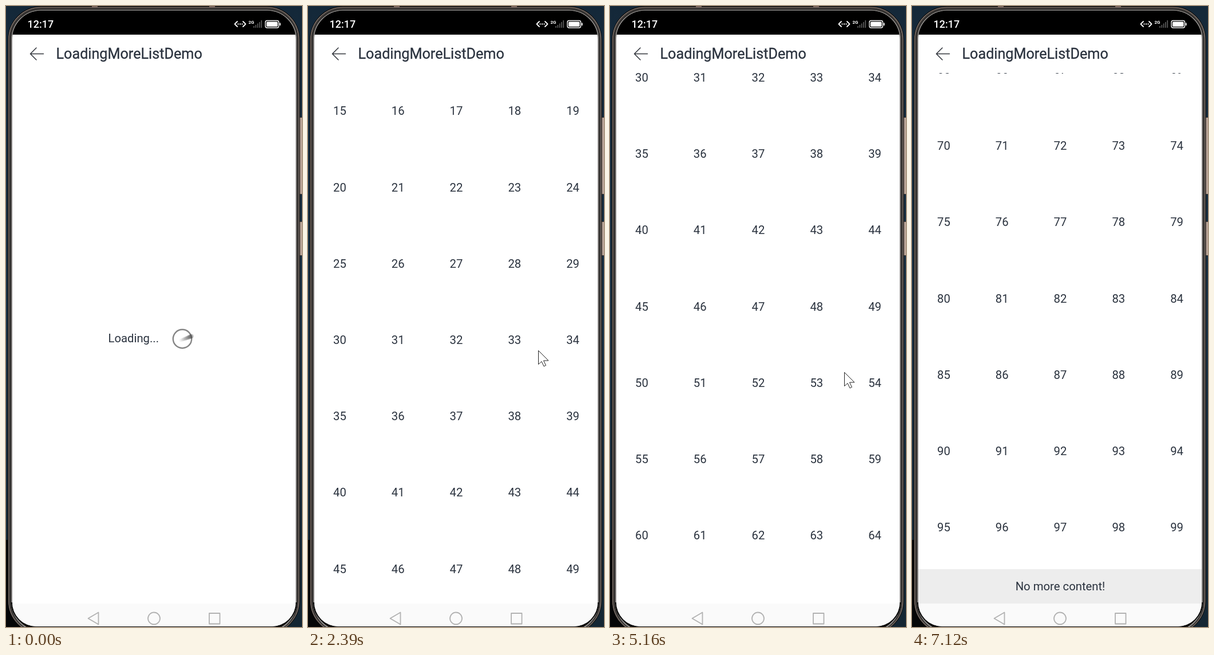
Write an HTML page that moves like this. It is 517 px wide and 1084 px high and loops after 7800 ms.

```html
<!DOCTYPE html>
<html lang="en">
<head>
<meta charset="utf-8">
<title>Loading more list</title>
<style>
  html, body { margin: 0; width: 100%; height: 100%; overflow: hidden; background: #000; }
  svg { display: block; width: 100%; height: 100%; }
  text { font: 20.3px Roboto, "Noto Sans", sans-serif; fill: #2b333f; }
  .title { font-size: 25.2px; stroke: #2b333f; stroke-width: .3; }
  .clock { font-size: 18px; font-weight: 500; fill: #fff; }
  .network { font-size: 8px; font-weight: 700; fill: #fff; }
  .center { text-anchor: middle; }
  .line { fill: none; stroke-linecap: round; stroke-linejoin: round; }
</style>
</head>
<body>
<svg viewBox="0 0 517 1084">
  <defs>
    <linearGradient id="backdrop" x2="0" y2="1">
      <stop offset="0" stop-color="#142839"/><stop offset=".5" stop-color="#1c3346"/>
      <stop offset="1" stop-color="#142633"/>
    </linearGradient>
    <clipPath id="screen">
      <path d="M11 58a50 50 0 0 1 50-50H456a50 50 0 0 1 50 50V1041a42 42 0 0 1-42 42H53a42 42 0 0 1-42-42z"/>
    </clipPath>
    <clipPath id="viewport"><rect x="11" y="117" width="495" height="926"/></clipPath>
  </defs>

  <!-- Phone body -->
  <rect width="517" height="1084" fill="url(#backdrop)"/>
  <rect y="932" width="60" height="152" fill="#050607"/>
  <g fill="#b9a497" stroke="#453b37">
    <rect x="512.5" y="194.5" width="8" height="134"/>
    <rect x="512.5" y="376.5" width="8" height="59"/>
  </g>
  <rect x="3.5" y=".5" width="509.5" height="1096" rx="58" fill="#17130f" stroke="#0a0a0a"/>
  <rect x="5" y="2.5" width="506.500" height="1092" rx="56" fill="none" stroke="#80756f" stroke-width="1.6"/>
  <rect x="7.5" y="5" width="502" height="1088" rx="53" fill="none" stroke="#3c3a39" stroke-width="2"/>
  <rect x="10" y="7.5" width="497" height="1084" rx="51" fill="none" stroke="#9b9a99" stroke-width="1.6"/>
  <path d="M150 1h10M355 1h10" stroke="#79645b" stroke-width="2"/>

  <path d="M11 1041a42 42 0 0 0 42 42H464a42 42 0 0 0 42-42" fill="none" stroke="#080808" stroke-width="4"/>
  <g clip-path="url(#screen)">
    <rect x="11" y="8" width="495" height="42"/>
    <rect x="11" y="50" width="495" height="1033" fill="#fff"/>

    <!-- Status bar -->
    <text class="clock" x="37.5" y="37.5">12:17</text>
    <path class="line" d="M404 27l-4.5 4.5 4.5 4.5M414 27l4.5 4.5-4.5 4.5" stroke="#fff" stroke-width="1.8"/>
    <path d="M404.5 31.5h2m1.5 0h2m1.5 0h2" stroke="#fff" stroke-width="2"/>
    <text class="network" x="423.5" y="31">2G</text>
    <path d="M433 38v-3m3.3 3v-5m3.3 5v-7.5m3.3 7.5v-10m3.3 10v-13" stroke="#5c5c5c" stroke-width="1.7"/>
    <rect x="453" y="25.5" width="23.5" height="12.5" rx="3" fill="none" stroke="#fff" stroke-width="1.4"/>
    <rect x="455" y="27.5" width="19.5" height="8.5" rx="1.5" fill="#fff"/>
    <path d="M478.7 29.5v4.5" stroke="#fff" stroke-width="1.8"/>

    <!-- Title bar -->
    <path class="line" d="M65.500 83.500H42.500M53 73L42.500 83.500 53 94" stroke="#30343b" stroke-width="1.5"/>
    <text class="title" x="87.5" y="92">LoadingMoreListDemo</text>

    <g clip-path="url(#viewport)">
      <g id="list"></g>
      <g id="footer">
        <rect x="11" width="495" height="61" fill="#ededed"/>
        <text id="footerLoading" x="184.5" y="37">Loading...</text>
        <text id="footerEnd" class="center" x="259" y="37">No more content!</text>
      </g>
    </g>
    <text id="firstLoading" x="178.5" y="587">Loading...</text>

    <!-- Navigation bar -->
    <rect x="11" y="1043" width="495" height="41" fill="#fafafa"/>
    <g class="line" stroke="#b2b2b2" stroke-width="1.8">
      <path d="M143.5 1069l18-10.5v21z"/>
      <circle cx="258.5" cy="1069" r="10.5"/>
      <rect x="355" y="1060" width="18.5" height="18.5"/>
    </g>
  </g>

  <g id="spinner">
    <circle id="ring" r="16.2" fill="none" stroke="#858585" stroke-width="2.4"/>
  </g>
  <path id="cursor" d="M.5.5v24l5.5-5 4 8.5 3.5-1.7-4-8.3h8.5z" fill="#fff" stroke="#222"/>
</svg>

<script>
const LOOP = 7800, LIST_TOP = 117, ROW = 133.2, COLUMNS = 5;
const FIRST_LOADED = 900, ALL_LOADED = 4270;
const TAIL = 16;
const $ = id => document.getElementById(id);

// Each key: time, value(s)
const scrollKeys = [
  [1900, 0], [2110, 112.8], [2260, 260], [2400, 400], [2530, 465.9],
  [4880, 465.9], [5160, 850], [5400, 1290], [5640, 1597], [5900, 1800],
  [6050, 1828], [6200, 1806.9], [6280, 1797.9]
];
const cursorKeys = [
  [1760, 352, 855], [1900, 356, 845], [2110, 387, 664], [2250, 402, 602],
  [2560, 402, 601], [2900, 410, 713], [4670, 410, 713], [4880, 345, 893],
  [4960, 345, 890], [5200, 420, 620], [5430, 452, 700], [5640, 486, 795],
  [5760, 496, 860], [6000, 470, 930], [6200, 443, 943], [6300, 452, 880],
  [6500, 479, 733], [6650, 475, 745], [7050, 415, 1084]
];

// Monotone cubic interpolation of one column of a key list
function sample(keys, t, column = 1) {
  const last = keys.length - 1;
  if (t <= keys[0][0]) return keys[0][column];
  if (t >= keys[last][0]) return keys[last][column];
  const i = keys.findIndex(key => key[0] > t) - 1;
  const slope = k => (keys[k + 1][column] - keys[k][column]) / (keys[k + 1][0] - keys[k][0]);
  const tangent = k => {
    if (k === 0 || k === last) return 0;
    const a = slope(k - 1), b = slope(k);
    return a * b > 0 ? 2 * a * b / (a + b) : 0;
  };
  const span = keys[i + 1][0] - keys[i][0], u = (t - keys[i][0]) / span, v = 1 - u;
  return keys[i][column] * (1 + 2 * u) * v * v + keys[i + 1][column] * (3 - 2 * u) * u * u
    + span * u * v * (tangent(i) * v - tangent(i + 1) * u);
}

function add(parent, tag, attributes) {
  const node = document.createElementNS('http://www.w3.org/2000/svg', tag);
  for (const name in attributes) node.setAttribute(name, attributes[name]);
  return parent.appendChild(node);
}

const items = Array.from({ length: 100 }, (_, i) => {
  const node = add($('list'), 'text', {
    class: 'center',
    x: 55.4 + i % COLUMNS * 101.8,
    y: 184.4 + Math.floor(i / COLUMNS) * ROW
  });
  node.textContent = i;
  return node;
});
const comet = Array.from({ length: TAIL }, () => add($('spinner'), 'circle', { fill: '#3c3c3c' }));

const show = (node, visible) => node.setAttribute('display', visible ? 'inline' : 'none');
const move = (node, x, y, scale = 1) =>
  node.setAttribute('transform', `translate(${x} ${y}) scale(${scale})`);

// Comet on a flat tilted orbit, brighter and larger on the near side
function drawComet(phase) {
  const tilt = -20 * Math.PI / 180;
  comet.forEach((dot, i) => {
    const angle = phase - i * 0.065, depth = Math.cos(angle), fade = 1 - i / TAIL;
    const x = 23.5 * Math.sin(angle), y = 1.5 * depth;
    dot.setAttribute('cx', x * Math.cos(tilt) - y * Math.sin(tilt));
    dot.setAttribute('cy', x * Math.sin(tilt) + y * Math.cos(tilt));
    dot.setAttribute('r', (3.4 + 0.7 * depth) * (0.65 + 0.35 * fade));
    dot.setAttribute('opacity', 0.24 * fade * (0.65 + 0.35 * depth));
  });
}

function draw(t) {
  const starting = t < FIRST_LOADED, complete = t >= ALL_LOADED;
  const scroll = sample(scrollKeys, t);
  const count = starting ? 0 : complete ? 100 : 50;
  const footerTop = LIST_TOP + count / COLUMNS * ROW - scroll;

  items.forEach((item, i) => show(item, i < count));
  move($('list'), 0, -scroll);
  move($('footer'), 0, footerTop);
  show($('footer'), !starting);
  show($('footerLoading'), !complete);
  show($('footerEnd'), complete);
  show($('firstLoading'), starting);

  show($('spinner'), starting || !complete && footerTop < 1015);
  if (starting) move($('spinner'), 308, 581);
  else move($('spinner'), 307.7, footerTop + 31, 0.81);
  $('ring').setAttribute('stroke-width', starting ? 2.4 : 2.7);
  const phase = starting ? 0.78 + t / 1200 * 2 * Math.PI
    : -0.42 + (t - 3230) / 1200 * 2 * Math.PI;
  drawComet(phase);

  show($('cursor'), t >= 1760 && t < 7050);
  move($('cursor'), Math.round(sample(cursorKeys, t, 1)), Math.round(sample(cursorKeys, t, 2)));
}

const start = performance.now();
function tick() {
  draw((performance.now() - start) % LOOP);
  requestAnimationFrame(tick);
}
tick();
</script>
</body>
</html>
```
